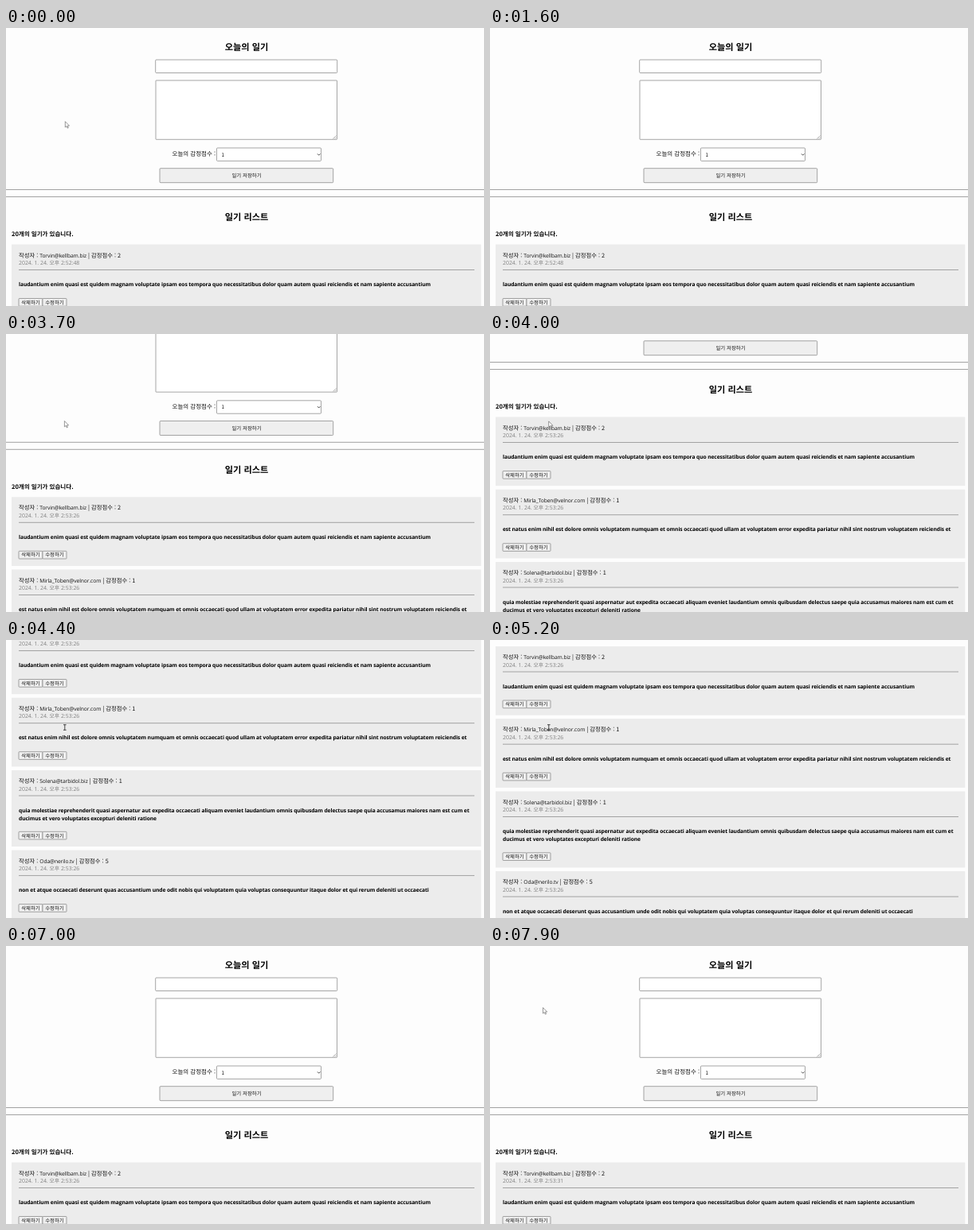
An HTML page that plays this animation: 600 px wide and 350 px high, repeating every 8000 ms.

```html
<!DOCTYPE html>
<html lang="ko">
<head>
<meta charset="utf-8">
<title>오늘의 일기</title>
<style>
html, body { margin: 0; width: 100%; height: 100%; overflow: hidden; background: #fdfdfd; }
svg { display: block; width: 600px; height: 350px; }
text { font: 7.5px "Noto Sans CJK KR", "Noto Sans CJK", sans-serif; fill: #111; white-space: pre; text-rendering: geometricPrecision; }
.author { font-size: 7.3px; }
.latin { font-family: "Open Sans", "Noto Sans CJK KR", sans-serif; font-size: 6.7px; letter-spacing: -.09px; }
.bold { font-weight: 700; fill: #000; }
.h2 { font-size: 11.2px; font-weight: 700; fill: #000; }
.btn { font-size: 6.4px; }
.date { font-size: 6.9px; letter-spacing: 0; fill: #808080; }
.mid { text-anchor: middle; }
.field { fill: #fff; stroke: #808080; stroke-width: .7; }
.push { fill: #efefef; stroke: #808080; stroke-width: .7; }
.rule { stroke: #a2a2a2; }
</style>
</head>
<body>
<svg viewBox="0 0 600 350">
  <g id="page">
    <text class="h2 mid" x="302" y="28.4">오늘의 일기</text>
    <rect class="field" x="187.7" y="40" width="228" height="16.5" rx="1"/>
    <rect class="field" x="188" y="66" width="227.5" height="74.3" rx=".5"/>
    <path d="M410.5 139.5l4-4M412.7 139.5l1.8-1.8" stroke="#777" stroke-width=".6"/>
    <text x="208.5" y="161.3">오늘의 감정점수 :</text>
    <rect class="field" x="264.5" y="151" width="131" height="16.4" rx="1"/>
    <text class="btn" x="270.5" y="161.5">1</text>
    <path d="M391 158.4l1.7 1.8 1.7-1.8" fill="none" stroke="#333" stroke-width=".9"/>
    <rect class="push" x="193" y="176.7" width="217.7" height="18" rx="1"/>
    <text class="btn mid" x="302" y="188.1">일기 저장하기</text>
    <path class="rule" d="M0 203.5H600M0 212.5H600"/>
    <text class="h2 mid" x="302" y="242.1">일기 리스트</text>
    <text class="bold" id="count" x="7" y="261.8"></text>
    <g id="list"></g>
  </g>
  <g id="cursor">
    <path id="arrow" d="M0 0V7.3L1.7 5.8 2.9 8.4 4 7.9 2.9 5.4H5.2Z" fill="#fff" stroke="#555" stroke-width=".6"/>
    <path id="beam" d="M-1.8-3.3H1.8M0-3.3V3.3M-1.8 3.3H1.8" fill="none" stroke="#333" stroke-width=".9"/>
  </g>
</svg>
<script>
const $ = id => document.getElementById(id);

const diaries = [
  { top: 272.5, height: 86.7, author: "Torvin@kellbam.biz", score: 2, lines: [
    "laudantium enim quasi est quidem magnam voluptate ipsam eos tempora quo necessitatibus dolor quam autem quasi reiciendis et nam sapiente accusantium"] },
  { top: 363.7, height: 86.7, author: "Mirla_Toben@velnor.com", score: 1, lines: [
    "est natus enim nihil est dolore omnis voluptatem numquam et omnis occaecati quod ullam at voluptatem error expedita pariatur nihil sint nostrum voluptatem reiciendis et"] },
  { top: 455, height: 96, author: "Solena@tarbidol.biz", score: 1, lines: [
    "quia molestiae reprehenderit quasi aspernatur aut expedita occaecati aliquam eveniet laudantium omnis quibusdam delectus saepe quia accusamus maiores nam est cum et",
    "ducimus et vero voluptates excepturi deleniti ratione"] },
  { top: 555.6, height: 86.7, author: "Oda@nerilo.tv", score: 5, lines: [
    "non et atque occaecati deserunt quas accusantium unde odit nobis qui voluptatem quia voluptas consequuntur itaque dolor et qui rerum deleniti ut occaecati"] }
];

const button = (label, x, y) =>
  `<rect class="push" x="${x}" y="${y}" width="30" height="9.7" rx=".8"/>` +
  `<text class="btn mid" x="${x + 15}" y="${y + 7.2}">${label}</text>`;

function card({ top, height, author, score, lines }) {
  const body = lines.map((line, i) =>
    `<text class="latin bold" x="16" y="${52.8 + i * 9.7}">${line}</text>`).join("");
  const foot = height - 18.7;
  return `<g transform="translate(0 ${top})">
    <rect x="7" width="589.3" height="${height}" fill="#ececec"/>
    <text class="author" x="16" y="16.2">작성자 : <tspan class="latin">${author}</tspan> | 감정점수 : ${score}</text>
    <text class="latin date" x="16" y="25.6">2024. 1. 24. 오후 <tspan class="time"></tspan></text>
    <path class="rule" d="M16 32H588"/>
    ${body}${button("삭제하기", 16, foot)}${button("수정하기", 46, foot)}
  </g>`;
}
$("list").innerHTML = diaries.map(card).join("");
const stamps = document.querySelectorAll(".time");

const LOOP = 8000, STEP = 100;
const scroll = [[3500, 0], [4000, 168], [4400, 291], [5000, 291], [5200, 264.5], [5600, 58.3], [5800, 58.3], [6000, 0]];
const pointer = [[0, 74.3, 117.7], [300, 74.3, 117.7], [900, 64, 52], [1300, 58, -14], [3100, 60, -14],
  [3500, 73.2, 109.3], [4100, 73.8, 110], [5900, 73.8, 110], [6500, 58, -14], [7500, 62, -14], [7900, 66.5, 77.6]];
const loads = [[0, "2:52:48"], [1900, ""], [2200, "2:53:26"], [7200, ""], [7500, "2:53:31"]];

function at(keys, t, n = 1) {
  const i = keys.findIndex(k => k[0] > t);
  if (i === 0) return keys[0][n];
  if (i < 0) return keys[keys.length - 1][n];
  const a = keys[i - 1], b = keys[i];
  return a[n] + (b[n] - a[n]) * (t - a[0]) / (b[0] - a[0]);
}

function draw(t) {
  $("page").setAttribute("transform", `translate(0 ${-at(scroll, t)})`);
  $("cursor").setAttribute("transform", `translate(${at(pointer, t, 1)} ${at(pointer, t, 2)})`);
  const beam = t >= 4100 && t < 5900;
  $("beam").style.display = beam ? "" : "none";
  $("arrow").style.display = beam ? "none" : "";

  const time = loads.filter(l => l[0] <= t).pop()[1];
  $("list").style.display = time ? "" : "none";
  $("count").textContent = `${time ? 20 : 0}개의 일기가 있습니다.`;
  stamps.forEach(s => s.textContent = time);
}

const start = performance.now();
function tick() {
  const t = (performance.now() - start) % LOOP;
  draw(Math.floor(t / STEP) * STEP);
  requestAnimationFrame(tick);
}
tick();
</script>
</body>
</html>
```
